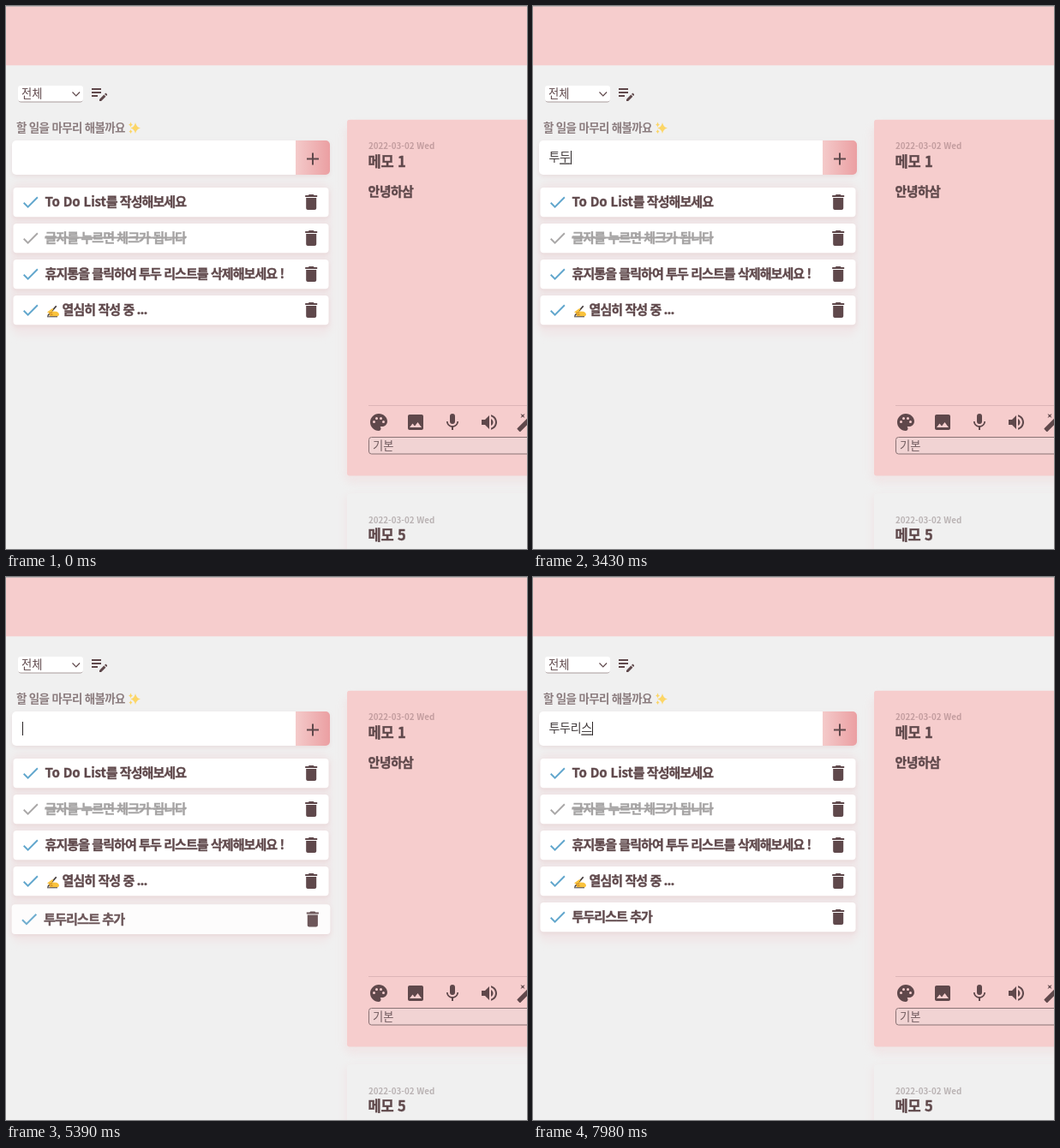
An HTML page for the animation above (8 s loop, 608x634 px).

```html
<!DOCTYPE html>
<html lang="ko">
<head>
<meta charset="utf-8">
<title>To Do List</title>
<style>
  html, body { margin: 0; width: 100%; height: 100%; overflow: hidden; background: #f0f0f0; }
  svg { display: block; }
  text {
    font-family: "Noto Sans CJK KR", "Noto Sans CJK JP", "Noto Sans", sans-serif;
    fill: #5f484b; white-space: pre;
  }
  .todo, .title, .body { font-weight: 700; stroke: #5f484b; stroke-width: .35px; }
  .todo { font-size: 15px; letter-spacing: -.92px; }
  .latin { letter-spacing: -.15px; }
  .done { fill: #a5a3a3; stroke: #a5a3a3; text-decoration: line-through; }
  .lead { font-size: 13.5px; font-weight: 700; letter-spacing: -.68px; fill: #8b7c7e; }
  .date { font-size: 9.8px; font-weight: 700; }
  .title { font-size: 16.5px; letter-spacing: -.2px; }
  .body { font-size: 15px; letter-spacing: -.6px; }
  .plain { font-size: 13.3px; }
  .typed { font-size: 14px; font-weight: 300; letter-spacing: -.28px; word-spacing: 1.74px; fill: #403a3b; }
  .ink { fill: #5f484b; }
</style>
</head>
<body>
<svg id="stage" width="608" height="634" viewBox="0 0 608 634">
  <defs>
    <linearGradient id="rose"><stop stop-color="#f4caca"/><stop offset="1" stop-color="#eb9fa2"/></linearGradient>
    <filter id="soft" x="-20%" y="-20%" width="140%" height="140%"><feGaussianBlur stdDeviation="4"/></filter>
    <filter id="lift" x="-5%" y="-40%" width="110%" height="200%">
      <feDropShadow dx="0" dy="2" stdDeviation="2.5" flood-color="#d9b2b4" flood-opacity=".3"/>
    </filter>
    <path id="check" d="M9 16.17 4.83 12l-1.42 1.41L9 19 21 7l-1.41-1.41z"/>
    <path id="trash" d="M6 19c0 1.1.9 2 2 2h8c1.1 0 2-.9 2-2V7H6v12zM19 4h-3.5l-1-1h-5l-1 1H5v2h14V4z"/>
    <path id="ibeam" d="M-4-9.5q4 0 4 3v13q0 3-4 3M4-9.5q-4 0-4 3v13q0 3 4 3M-2.5.5h5"/>
  </defs>

  <rect width="608" height="634" fill="#f0f0f0"/>
  <rect width="608" height="69.3" fill="#f6cdcd"/>
  <rect width="608" height="1" fill="#c3b5b6"/>

  <!-- toolbar -->
  <rect x="14.5" y="94" width="75" height="18.5" rx="3" fill="#a99b9c"/>
  <rect x="14" y="93" width="76" height="18.5" rx="3" fill="#fff"/>
  <text class="plain" x="18" y="106.5">전체</text>
  <path d="M77.5 100.5l4.3 4.3 4.3-4.3" fill="none" stroke="#5f484b" stroke-width="1.2"/>
  <path class="ink" transform="translate(97 90)" d="M3 10h11v2H3v-2zm0-2h11V6H3v2zm0 8h7v-2H3v2zm15.01-3.13.71-.71c.39-.39 1.02-.39 1.41 0l.71.71c.39.39.39 1.02 0 1.41l-.71.71-2.12-2.12zm-.71.71-5.3 5.3V21h2.12l5.3-5.3-2.12-2.12z"/>

  <!-- to-do column -->
  <rect id="glow" x="5" y="205" width="375" fill="#f0e7e8" rx="14" filter="url(#soft)"/>
  <text class="lead" x="12" y="146.5">할 일을 마무리 해볼까요</text>
  <g fill="#fcd667">
    <path d="M151 136q1 5.5 6 6.5-5 1-6 6.5-1-5.5-6-6.5 5-1 6-6.5z"/>
    <path d="M145.5 135.5q.5 2.5 2.5 3-2 .5-2.5 3-.5-2.5-2.5-3 2-.5 2.5-3zM145.5 144q.5 2 2 2.5-1.5.5-2 2.5-.5-2-2-2.5 1.5-.5 2-2.5z"/>
  </g>
  <g filter="url(#lift)">
    <path d="M338 157H12a5 5 0 0 0-5 5v30a5 5 0 0 0 5 5h326z" fill="#fff"/>
    <path d="M338 157h35a5 5 0 0 1 5 5v30a5 5 0 0 1-5 5h-35z" fill="url(#rose)"/>
  </g>
  <path d="M351 178.5h14M358 171.5v14" stroke="#5f484b" stroke-width="2"/>
  <g id="list"></g>

  <!-- memo cards -->
  <rect x="394" y="138" width="230" height="420" rx="12" fill="#f0e4e5" opacity=".8" filter="url(#soft)"/>
  <rect x="398" y="132.7" width="230" height="415.8" rx="3" fill="#f6cdcd"/>
  <text class="date" x="423" y="167.3" style="fill:#c39d9f">2022-03-02 Wed</text>
  <text class="title" x="422.5" y="187.7">메모 1</text>
  <text class="body" x="422.5" y="221.7">안녕하삼</text>
  <rect x="423" y="466" width="185" height="1" fill="#dcb5b7"/>
  <g id="tools" class="ink"></g>
  <rect x="423.5" y="503.5" width="200" height="19.5" rx="3" fill="#f1d3d3" stroke="#8a7274"/>
  <text class="plain" x="428" y="518" style="fill:#735d60">기본</text>
  <rect x="395" y="571" width="230" height="90" rx="6" fill="#f0e7e8" filter="url(#soft)"/>
  <rect x="398" y="569" width="230" height="90" rx="3" fill="#f0f0f0"/>
  <text class="date" x="423" y="603.5" style="fill:#bab3b4">2022-03-02 Wed</text>
  <text class="title" x="422.5" y="624">메모 5</text>

  <!-- input field -->
  <text id="typed" class="typed" x="18.5" y="181"></text>
  <line id="spell" x1="19.5" x2="80.5" y1="183" y2="183" stroke="#d9534f" stroke-width="2" stroke-dasharray="2 1.8"/>
  <rect id="compose" y="183.5" width="12.6" height="1.2" fill="#2b2627"/>
  <rect id="caret" y="169" width="1" height="16" fill="#2b2627"/>

  <path id="arrow" d="M0 0v17.2l4-3.7 3.1 7 3.2-1.4-3-6.7h5.5z" fill="#000" stroke="#fff" stroke-width="1.2"/>
  <g id="beam" fill="none">
    <use href="#ibeam" stroke="#fff" stroke-width="3.2"/>
    <use href="#ibeam" stroke="#111" stroke-width="1.5"/>
  </g>
</svg>

<script>
const LOOP = 8000, STEP = 70, ADD_AT = 5250, ADD_MS = 280;
const FIELD_X = 18.5, CHAR_W = 12.6, SPACE_W = 4.6;
const $ = id => document.getElementById(id);
const show = (el, on) => el.setAttribute('display', on ? 'inline' : 'none');

// [time, field text, caret visible]
const FIELD = [
  [0, '', 0], [1540, '', 1], [2100, '', 0], [2660, '', 1],
  [2870, '투', 1], [3360, '툳', 1], [3430, '투두', 1],
  [3710, '투둘', 1], [3780, '투두리', 1], [3850, '투두릿', 1], [3920, '투두리스', 1],
  [4130, '투두리슽', 1], [4270, '투두리스트', 1], [4340, '투두리스트 ', 1],
  [4480, '투두리스트 ㅊ', 1], [4550, '투두리스트 추', 1], [4690, '투두리스트 축', 1], [4760, '투두리스트 추가', 1],
  [5040, '', 1], [5530, '', 0], [6090, '', 1], [6580, '', 0],
  [6720, 'ㅌ', 1], [6790, '투', 1], [7210, '툳', 1], [7280, '투두', 1],
  [7700, '투둘', 1], [7770, '투두리', 1], [7840, '투두릿', 1], [7980, '투두리스', 1]
];

// Pointer paths: [time, x, y]; each shape shows from its first time until `end`
const POINTERS = [
  { el: $('arrow'), end: 1050, path: [[70, 588, 614], [420, 263, 328], [560, 263, 328], [770, 218, 246], [980, 182.5, 185.5]] },
  { el: $('beam'), end: 2870, path: [[1050, 162, 166], [1190, 133, 157], [1260, 140, 165], [1470, 140, 165], [1540, 152, 172], [1610, 160, 185], [1680, 152, 178]] },
  { el: $('beam'), end: 6720, path: [[6300, 150.5, 177], [6580, 141, 175]] }
];

const HAND = `<g transform="translate(46 11)">
  <path d="M12 .8l1.400 1L4 12.500l-1.800.8.500-1.800z" fill="#433b3b"/>
  <path d="M2 8.500l5.500-4q1.500-.8 2 .4l-2 2.600 5.500.3q3 1 3 4.200l-2 1.500H6q-1.800-.6-.8-2-1.700-.5-.7-2z" fill="#f9c23c"/>
  <path d="M5.500 11.500l3-.2M4.500 9.500l3.500-.5" stroke="#c9821f" fill="none"/>
  <path d="M2 13.800h12" stroke="#433b3b"/></g>`;

const ROWS = [
  { text: '<tspan class="latin">To Do List</tspan>를 작성해보세요' },
  { text: '글자를 누르면 체크가 됩니다', done: true },
  { text: '휴지통을 클릭하여 투두 리스트를 삭제해보세요 !' },
  { text: '열심히 작성 중 ...', x: 65.5, art: HAND },
  { text: '투두리스트 추가' }
];

$('list').innerHTML = ROWS.map((r, i) => `<g transform="translate(0 ${212 + 42 * i})"><g class="row">
  <rect x="8.5" width="368" height="34.3" rx="4" fill="#fff" filter="url(#lift)"/>
  <use href="#check" x="16.6" y="5" fill="${r.done ? '#aaa8a8' : '#62a7cd'}"/>
  ${r.art || ''}<text class="todo ${r.done ? 'done' : ''}" x="${r.x || 45.5}" y="22.2">${r.text}</text>
  <use href="#trash" x="344.2" y="5" class="ink"/></g></g>`).join('');
const newRow = [...document.querySelectorAll('.row')].pop();

const TOOLS = [
  [435, 'M12 2C6.49 2 2 6.49 2 12s4.49 10 10 10c1.380 0 2.500-1.120 2.500-2.500 0-.61-.23-1.200-.64-1.670-.08-.1-.13-.21-.13-.33 0-.28.22-.5.5-.5H16c3.310 0 6-2.690 6-6 0-4.960-4.490-9-10-9zM6.500 13a1.500 1.500 0 1 1 0-3 1.500 1.500 0 0 1 0 3zm3-4a1.500 1.500 0 1 1 0-3 1.500 1.500 0 0 1 0 3zm5 0a1.500 1.500 0 1 1 0-3 1.500 1.500 0 0 1 0 3zm3 4a1.500 1.500 0 1 1 0-3 1.500 1.500 0 0 1 0 3z'],
  [478, 'M21 19V5c0-1.100-.9-2-2-2H5c-1.100 0-2 .9-2 2v14c0 1.100.9 2 2 2h14c1.100 0 2-.9 2-2zM8.500 13.500l2.500 3.010L14.500 12l4.500 6H5z'],
  [521, 'M12 14a3 3 0 0 0 3-3V5a3 3 0 0 0-6 0v6a3 3 0 0 0 3 3zm5.300-3c0 3-2.540 5.100-5.300 5.100S6.700 14 6.700 11H5c0 3.410 2.720 6.230 6 6.720V21h2v-3.280c3.280-.48 6-3.300 6-6.720z'],
  [564, 'M3 9v6h4l5 5V4L7 9zm13.500 3c0-1.770-1.020-3.290-2.500-4.030v8.050c1.480-.73 2.500-2.250 2.500-4.020zM14 3.230v2.060c2.890.86 5 3.540 5 6.710s-2.110 5.850-5 6.710v2.060c4.010-.91 7-4.490 7-8.770s-2.990-7.860-7-8.770z'],
  [607.5, 'M7.500 5.600L10 7 8.600 4.500 10 2 7.500 3.400 5 2l1.400 2.500L5 7zM14.370 7.290c-.39-.39-1.020-.39-1.410 0L1.290 18.960c-.39.39-.39 1.020 0 1.410l2.340 2.340c.39.39 1.020.39 1.410 0L16.700 11.050c.39-.39.39-1.020 0-1.410z']
];
$('tools').innerHTML = TOOLS.map(([x, d]) =>
  `<path transform="translate(${x - 12} 474)" d="${d}"/>`).join('');

function along(path, t) {
  const i = path.findIndex(k => k[0] > t);
  if (i < 0) return path[path.length - 1].slice(1);
  const [t0, x0, y0] = path[i - 1], [t1, x1, y1] = path[i];
  const u = (t - t0) / (t1 - t0);
  return [x0 + (x1 - x0) * u, y0 + (y1 - y0) * u];
}

const endX = text => [...text].reduce((x, c) => x + (c === ' ' ? SPACE_W : CHAR_W), FIELD_X);

function drawField(t) {
  const [, text, caretOn] = FIELD.filter(k => k[0] <= t).pop();
  const end = endX(text);
  $('typed').textContent = text;
  $('caret').setAttribute('x', Math.round(end));
  show($('caret'), caretOn);
  $('compose').setAttribute('x', end - CHAR_W);
  show($('compose'), text && !text.endsWith(' '));
  show($('spell'), text.includes(' '));
}

function drawPointer(t) {
  show($('arrow'), false);
  show($('beam'), false);
  const p = POINTERS.find(p => t >= p.path[0][0] && t < p.end);
  if (!p) return;
  p.el.setAttribute('transform', `translate(${along(p.path, t)})`);
  show(p.el, true);
}

function drawNewRow(t) {
  const added = t >= ADD_AT;
  show(newRow, added);
  $('glow').setAttribute('height', added ? 222 : 180);
  const q = (1 - Math.min(1, Math.max(0, t - ADD_AT) / ADD_MS)) ** 2;
  newRow.setAttribute('transform',
    `translate(192.5 ${17 + 10 * q}) scale(${1 + .04 * q}) translate(-192.5 -17)`);
  newRow.setAttribute('opacity', 1 - .4 * q);
}

const start = performance.now();
function frame() {
  const now = Math.max(0, performance.now() - start) % LOOP;
  const t = Math.floor(now / STEP) * STEP;
  drawField(t);
  drawPointer(t);
  drawNewRow(t);
  requestAnimationFrame(frame);
}
frame();
</script>
</body>
</html>
```
